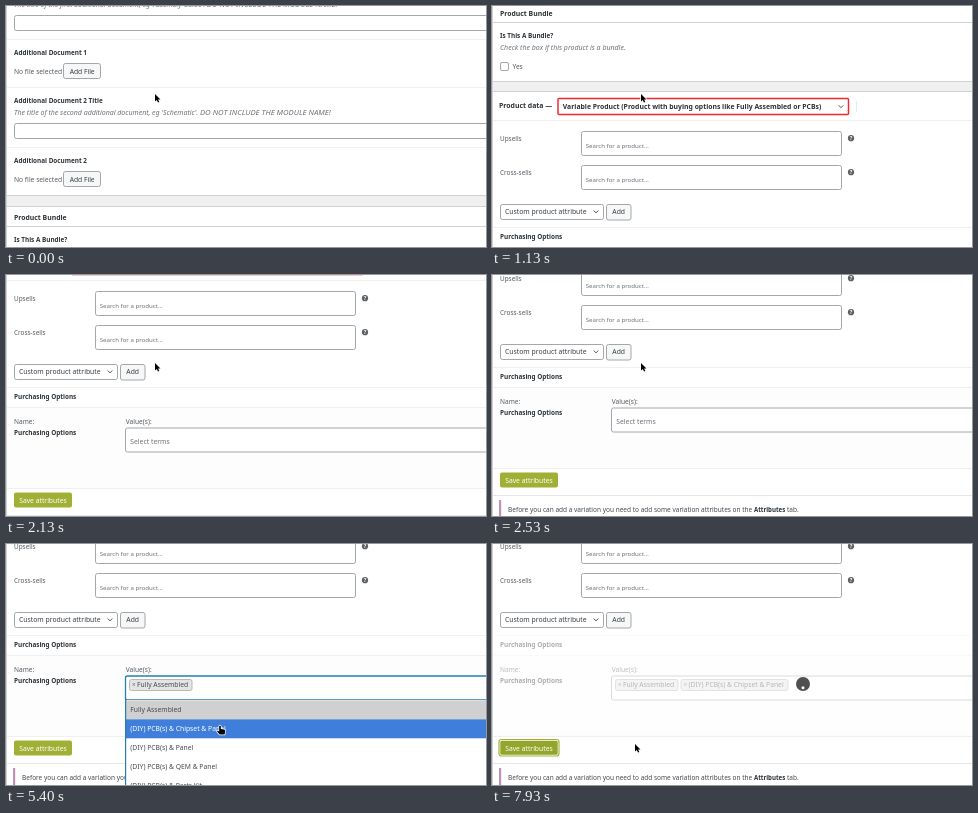
An HTML page with a canvas for the animation above (8000 ms loop, 480x241 px).

```html
<!DOCTYPE html>
<html lang="en">
<head>
<meta charset="utf-8">
<title>Product attributes</title>
<style>
  html, body { margin: 0; width: 100%; height: 100%; overflow: hidden; background: #fff; }
  canvas { display: block; width: 480px; height: 241px; }
</style>
</head>
<body>
<canvas id="stage"></canvas>
<script>
const W = 480, H = 241, LOOP = 8000, FRAME = 1000 / 15;
const canvas = document.getElementById('stage');
const ctx = canvas.getContext('2d');
const dpr = window.devicePixelRatio || 1;
canvas.width = W * dpr;
canvas.height = H * dpr;

const INK = '#2c3237', BODY = '#555b61', SOFT = '#6c7177';
const EDGE = '#a3a6aa', RULE = '#e6e6e8', PANEL = '#d0d1d4', FAINT = '#f0f0f0';
const FOCUS = '#2580b3', HILITE = '#3f7fdb';
const OPTIONS = [
  'Fully Assembled',
  '(DIY) PCB(s) & Chipset & Panel',
  '(DIY) PCB(s) & Panel',
  '(DIY) PCB(s) & QEM & Panel',
  '(DIY) PCB(s) & Parts Kit'
];

// Keys: [ms, value...]
const SCROLL = [
  [0, 0], [329, 0], [330, 12], [470, 12], [1133, 204], [1333, 226], [1400, 234],
  [1733, 273], [2200, 320], [2267, 320], [2533, 333], [3140, 333], [3200, 334]
];
const POINTER = [
  [0, 149, 88], [3140, 149, 88], [3400, 163, 153], [3799, 163, 153],
  [3800, 168, 166], [4129, 168, 166], [4130, 173, 167], [4270, 173, 167],
  [4600, 298, 226], [4940, 298, 226], [5067, 196, 158], [5133, 205, 164],
  [5270, 205, 164], [5330, 208, 172], [5400, 214, 182], [5729, 214, 182],
  [5730, 215, 178], [5870, 215, 178], [6000, 253, 178], [6540, 253, 178],
  [6733, 181, 177], [6929, 181, 177], [6930, 72, 198], [7070, 72, 198],
  [7133, 46, 203], [7333, 50, 204], [7533, 113, 200], [7670, 113, 200], [7933, 143, 200]
];
const SHAPES = [
  [0, 'arrow'], [3400, 'beam'], [3800, 'hand'], [4130, 'arrow'], [5000, 'hand'],
  [5730, 'arrow'], [7130, 'hand'], [7400, 'arrow']
];

function track(keys, t) {
  let i = 0;
  while (i < keys.length - 1 && keys[i + 1][0] <= t) i++;
  const a = keys[i], b = keys[i + 1];
  if (!b) return a.slice(1);
  const p = (t - a[0]) / (b[0] - a[0]);
  return a.slice(1).map((v, n) => v + (b[n + 1] - v) * p);
}

const latest = (keys, t) => keys.filter(k => k[0] <= t).pop()[1];
const between = (t, a, b) => t >= a && t < b;

// Text is placed by its vertical middle; returns the right end.
function text(s, x, y, size = 6.6, color = BODY, style = '') {
  ctx.font = `${style} ${size}px "Noto Sans", sans-serif`;
  ctx.fillStyle = color;
  ctx.fillText(s, x, y + 2.5);
  return x + ctx.measureText(s).width;
}
const label = (s, x, y, size = 6.37) => text(s, x, y, size, INK, 'bold');
const hint = (s, y) => text(s, 8, y, 7, SOFT, 'italic');

function rect(x, y, w, h, color) {
  ctx.fillStyle = color;
  ctx.fillRect(x, y, w, h);
}
function rule(y, color = RULE) { rect(1, y, W, 1, color); }

function box(x, y, w, h, fill, stroke, r = 2, line = 1) {
  ctx.beginPath();
  ctx.roundRect(x, y, w, h, r);
  if (fill) { ctx.fillStyle = fill; ctx.fill(); }
  if (stroke) { ctx.strokeStyle = stroke; ctx.lineWidth = line; ctx.stroke(); }
}

function chevron(x, y) {
  ctx.beginPath();
  ctx.moveTo(x - 2.3, y - 1.2);
  ctx.lineTo(x, y + 1.2);
  ctx.lineTo(x + 2.3, y - 1.2);
  ctx.strokeStyle = '#50565c';
  ctx.lineWidth = 1;
  ctx.stroke();
}

function dot(x, y, r, color) {
  ctx.beginPath();
  ctx.arc(x, y, r, 0, Math.PI * 2);
  ctx.fillStyle = color;
  ctx.fill();
}

function help(x, y) {
  dot(x, y, 3.1, '#5c6166');
  text('?', x - 1.3, y - .3, 5.4, '#fff', 'bold');
}

function fileRow(y) {
  text('No file selected', 8, y, 6.7);
  box(57.5, y - 7.5, 37, 15, '#f6f7f7', EDGE);
  text('Add File', 63.7, y, 6.7, '#3a4046');
}

function docHint(which, example, y) {
  const end = hint(`The title of the ${which} additional document, eg '${example}'. `, y);
  text('DO NOT INCLUDE THE MODULE NAME!', end, y, 7.7, SOFT, 'italic');
}

function searchRow(name, y) {
  text(name, 8, y - .3, 6.4);
  box(89.5, y - 7, 260, 24, '#fff', EDGE);
  text('Search for a product…', 93.7, y + 6.5, 6.1, SOFT);
  help(359, y - .3);
}

function documents() {
  docHint('first', 'Assembly Guide', -1.2);
  box(8.5, 9.5, 500, 15, '#fff', EDGE);
  rule(33, FAINT);
  label('Additional Document 1', 8, 46.7);
  fileRow(65);
  rule(81, FAINT);
  label('Additional Document 2 Title', 8, 94.5);
  docHint('second', 'Schematic', 106);
  box(8.5, 117.5, 500, 15, '#fff', EDGE);
  rule(141, FAINT);
  label('Additional Document 2', 8, 154.5);
  fileRow(173);
  gap(189, 200);
}

function gap(top, bottom) {
  rect(0, top, W, bottom - top + 1, '#f0f0f1');
  rule(top, PANEL);
  rule(bottom, PANEL);
}

function bundle() {
  label('Product Bundle', 8, 211, 6.85);
  rule(220, PANEL);
  label('Is This A Bundle?', 8, 233.8);
  hint('Check the box if this product is a bundle.', 245.5);
  box(8.5, 260.5, 8, 8, '#fff', EDGE, 1.5);
  text('Yes', 20.5, 264.4);
  gap(279, 289);
}

function productData(t) {
  label('Product data —', 7, 303.8, 6.9);
  box(66, 296.5, 290.5, 16, '#fff', '#ee2a2e', 1, 1.5);
  label('Variable Product (Product with buying options like Fully Assembled or PCBs)', 70.8, 304.4, 6.83);
  chevron(349, 304.5);
  rect(364, 299, 1, 11, '#e8e8ea');
  rule(318, FAINT);
  searchRow('Upsells', 336.5);
  searchRow('Cross-sells', 370.5);
  box(8.5, 402.5, 103, 15, '#fff', EDGE);
  text('Custom product attribute', 12.9, 409.5, 6.85, '#3a4046');
  chevron(104, 409.7);
  box(114.5, 402.5, 24.5, 15.5, '#f6f7f7', EDGE);
  text('Add', 120.3, 409.8, 6.8, '#3a4046');
  rule(425, FAINT);
  label('Purchasing Options', 8, 434.3);
  rect(1, 445, W, 81, '#fdfdfd');
  rule(445, FAINT);
  text('Name:', 8, 459.7, 6.55);
  label('Purchasing Options', 8, 470.3);
  text('Value(s):', 119.8, 459.7, 6.6);
  field(t);
  rule(526, FAINT);
  saveButton(t);
  rule(553);
  notice();
}

function tag(s, x, w) {
  box(x + .5, 469.5, w, 11, '#e4e4e4', '#b8b8b8', 2);
  text('×', x + 3, 474.8, 6.4, SOFT);
  text(s, x + 8, 474.8, 6.75, '#454b51');
}

function field(t) {
  const open = isOpen(t);
  const focused = between(t, 3400, 7130);
  box(119.5, 466, 500, 24, '#fff', focused ? FOCUS : EDGE, 2, open ? 1.3 : 1);
  if (t < 4130) text('Select terms', 124.3, 479.6, 6.8, SOFT);
  else tag(OPTIONS[0], 123, 62.5);
  if (t >= 5730) tag(OPTIONS[1], 188.5, 107);
  if (between(t, 4130, 4730)) rect(190.5, 475, 1, 9, INK);
  if (between(t, 5730, 6330) || between(t, 6930, 7130)) rect(300.7, 475, 1, 9, INK);
}

function saveButton(t) {
  if (t >= 7130) {
    box(7, 529.5, 60, 16.5, '#fff', '#a3b13c', 2.5, 1.2);
    box(8.3, 530.8, 57.4, 13.9, '#94a52c', null, 1.5);
  } else {
    box(8, 530.5, 58, 15, '#a0b035', null, 2);
  }
  text('Save attributes', 13.2, 538, 6.75, '#fff');
}

function notice() {
  rect(7, 558, W, 40, '#fff');
  rect(7, 558, 2.2, 40, '#c28fba');
  let x = text('Before you can add a variation you need to add some variation attributes on the ', 16, 567.7, 6.5, '#454b51');
  x = label('Attributes', x, 567.7, 6.1);
  text(' tab.', x, 567.7, 6.5, '#454b51');
}

const isOpen = t => between(t, 3400, 4130) || between(t, 4800, 5730);

function dropdown(t) {
  if (!isOpen(t)) return;
  const active = t >= 5370 ? 1 : 0;
  rect(119, 490, W, 120, '#fff');
  OPTIONS.forEach((name, i) => {
    const y = 490.3 + i * 19;
    if (i === active) rect(120, y, W, 19, HILITE);
    else if (i === 0) rect(120, y, W, 19, '#d0d0d0');
    text(name, 124.3, y + 9.3, 6.78, i === active ? '#fff' : '#454b51');
  });
  rect(119, 489, 1.2, 120, FOCUS);
}

function loading(t) {
  const fade = Math.min(1, Math.max(0, (t - 7270) / 260));
  if (!fade) return;
  rect(1, 425, W, 96, `rgba(255,255,255,${.6 * fade})`);
  ctx.globalAlpha = fade;
  dot(311, 474, 7, '#505050');
  const turn = (t - 7433) / 1000 * Math.PI * 2;
  dot(311 + Math.sin(turn) * 3.8, 474 - Math.cos(turn) * 3.8, 1.5, '#fff');
  ctx.globalAlpha = 1;
}

function outlined(path) {
  const p = new Path2D(path);
  ctx.lineJoin = 'round';
  ctx.strokeStyle = '#fff';
  ctx.lineWidth = 1.4;
  ctx.stroke(p);
  ctx.fillStyle = '#000';
  ctx.fill(p);
}

const CURSORS = {
  arrow: 'M0 0V7.6L1.8 6L3 8.6L4.3 8L3.1 5.5H5.5Z',
  hand: 'M-.8 0Q0 -.8 .8 0V3L4 3.5Q5.3 3.8 5.2 5L4.6 8.6H-.4L-3 5.2Q-2.6 4.3 -.8 5.5Z',
  beam: 'M-1.8 -5H1.8V-4.2H.4V4.2H1.8V5H-1.8V4.2H-.4V-4.2H-1.8Z'
};

function pointer(t) {
  const [x, y] = track(POINTER, t);
  ctx.save();
  ctx.translate(x, y);
  outlined(CURSORS[latest(SHAPES, t)]);
  ctx.restore();
}

function draw(now) {
  const t = Math.floor((now % LOOP + 5) / FRAME) * FRAME % LOOP;
  ctx.setTransform(dpr, 0, 0, dpr, 0, 0);
  rect(0, 0, W, H, '#fff');
  ctx.save();
  ctx.translate(0, -Math.round(track(SCROLL, t)[0]));
  documents();
  bundle();
  productData(t);
  dropdown(t);
  loading(t);
  ctx.restore();
  rect(0, 0, 1, H, PANEL);
  pointer(t);
}

let start = null;
function tick(now) {
  if (start === null) start = now;
  draw(now - start);
  requestAnimationFrame(tick);
}
draw(0);
requestAnimationFrame(tick);
</script>
</body>
</html>
```
